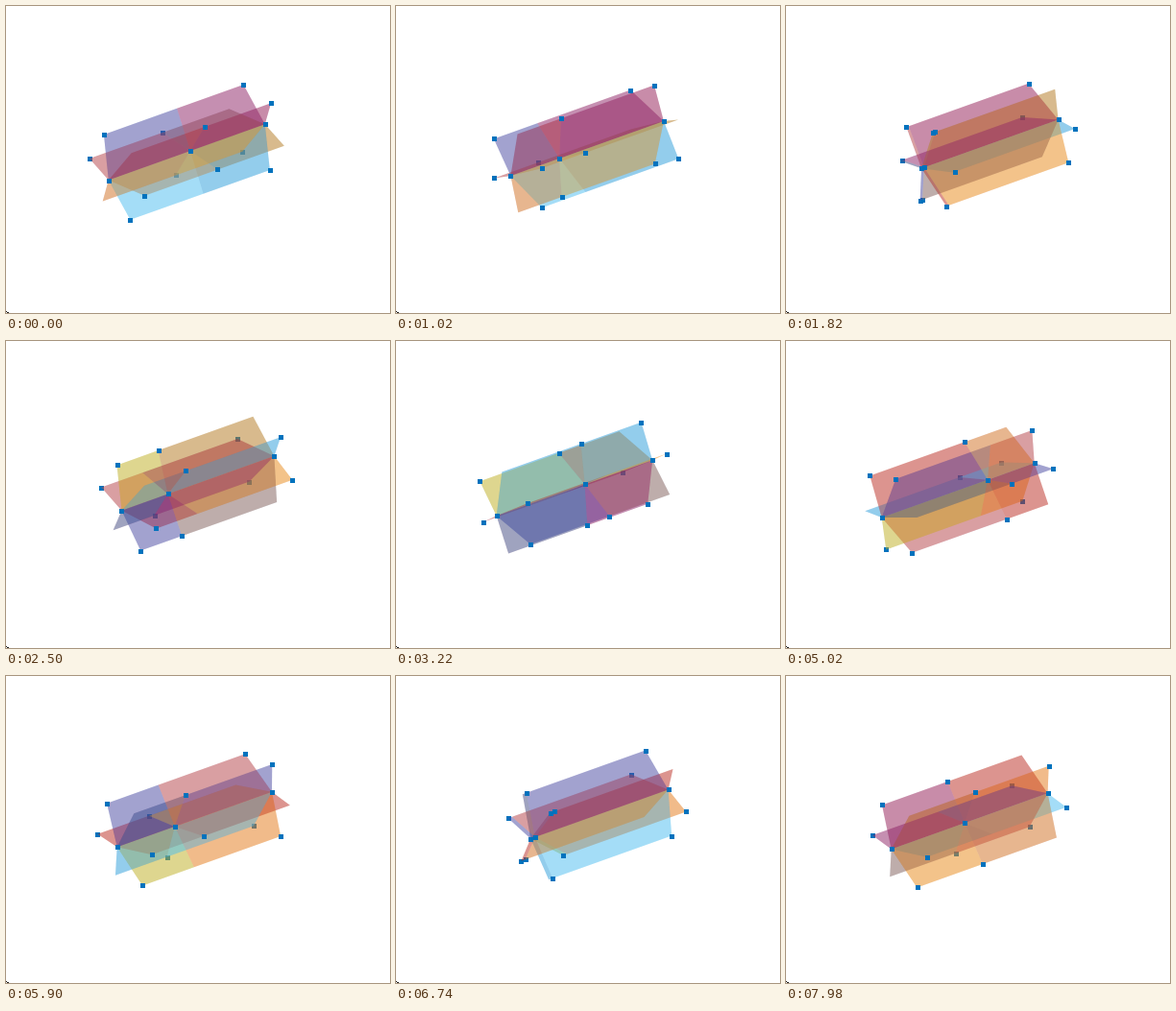
Animation of 400x320 px, one loop 8 s. Source, as an HTML page:

```html
<!DOCTYPE html>
<html lang="en">
<head>
<meta charset="utf-8">
<title>Rotating four-dimensional solid</title>
<style>
html, body { margin: 0; width: 100%; height: 100%; overflow: hidden; background: #fff; }
svg { display: block; width: 100vw; height: 100vh; }
</style>
</head>
<body>
<svg id="stage" viewBox="0 0 400 320">
  <path d="M0 318h1v1h-1zM1 319h2v1h-2z" fill="#222"/>
</svg>
<script>
const LOOP = 8000, HOLD = 460, STEP = 40;
const CENTER = [189.5, 152];
const COLORS = { P: '#7e2f8e', R: '#a2142f', O: '#d95319', Y: '#edb120', G: '#77ac30', B: '#0072bd', C: '#4dbeee' };

// Sheets between two corners of the triangle, one letter per hexagon spoke.
const BANDS = [
  { from: 0, to: 1, colors: 'PGBOBR' },
  { from: 1, to: 2, colors: 'OYCRPB' },
  { from: 2, to: 0, colors: 'ROCYOP' }
];

const stage = document.getElementById('stage');
const make = (tag, parent, attrs = {}) => {
  const el = document.createElementNS('http://www.w3.org/2000/svg', tag);
  for (const key in attrs) el.setAttribute(key, attrs[key]);
  return parent.appendChild(el);
};
const layer = () => make('g', stage);
const plus = (a, b) => [a[0] + b[0], a[1] + b[1]];
const range = n => Array.from({ length: n }, (_, i) => i);

const back = layer(), middle = layer(), front = layer();

const sheets = BANDS.flatMap(({ from, to, colors }) => [...colors].map((c, spoke) => ({
  from, to, spoke,
  el: make('polygon', middle, { fill: COLORS[c], 'fill-opacity': 0.3 })
})));

// Each triangle corner marks its hub and all spokes but one opposite pair.
const dots = range(3).flatMap(corner => [
  { corner, hub: true },
  ...range(6).filter(i => i % 3 !== (corner + 1) % 3).map(spoke => ({ corner, spoke }))
]);
for (const dot of dots) {
  dot.el = make('rect', front, { width: 5, height: 5, fill: COLORS.B, 'shape-rendering': 'crispEdges' });
}

// Two independent turns: a triangle along the long axis, a hexagon across it.
const triangle = (corner, k) => Math.cos((k - 33) / 60 + corner * 2 * Math.PI / 3);
const angle = (spoke, k) => 5.26 - 0.04 * k + spoke * Math.PI / 3;
const along = (u, scale = 1) => plus(CENTER, [84 * u * scale, -30 * u * scale]);
const across = a => [28.7 * Math.cos(a), 18.3 * Math.cos(a) + 40.7 * Math.sin(a)];
const isBehind = a => Math.cos(a - 2.5) > 0.72;

function draw(time) {
  const k = Math.max(0, Math.floor((time - HOLD) / STEP));
  const hub = corner => along(triangle(corner, k), 1.12);
  const tip = (corner, spoke) => plus(along(triangle(corner, k)), across(angle(spoke, k)));

  for (const { from, to, spoke, el } of sheets) {
    const corners = [tip(from, spoke), tip(to, spoke), hub(to), hub(from)];
    el.setAttribute('points', corners.map(p => p.map(v => v.toFixed(2)).join()).join(' '));
  }
  for (const dot of dots) {
    const [x, y] = dot.hub ? hub(dot.corner) : tip(dot.corner, dot.spoke);
    dot.el.setAttribute('x', Math.round(x) - 2);
    dot.el.setAttribute('y', Math.round(y) - 2);
    const home = !dot.hub && isBehind(angle(dot.spoke, k)) ? back : front;
    if (dot.el.parentNode !== home) home.appendChild(dot.el);
  }
}

const start = performance.now();
function tick() {
  draw((performance.now() - start) % LOOP);
  requestAnimationFrame(tick);
}
tick();
</script>
</body>
</html>
```
